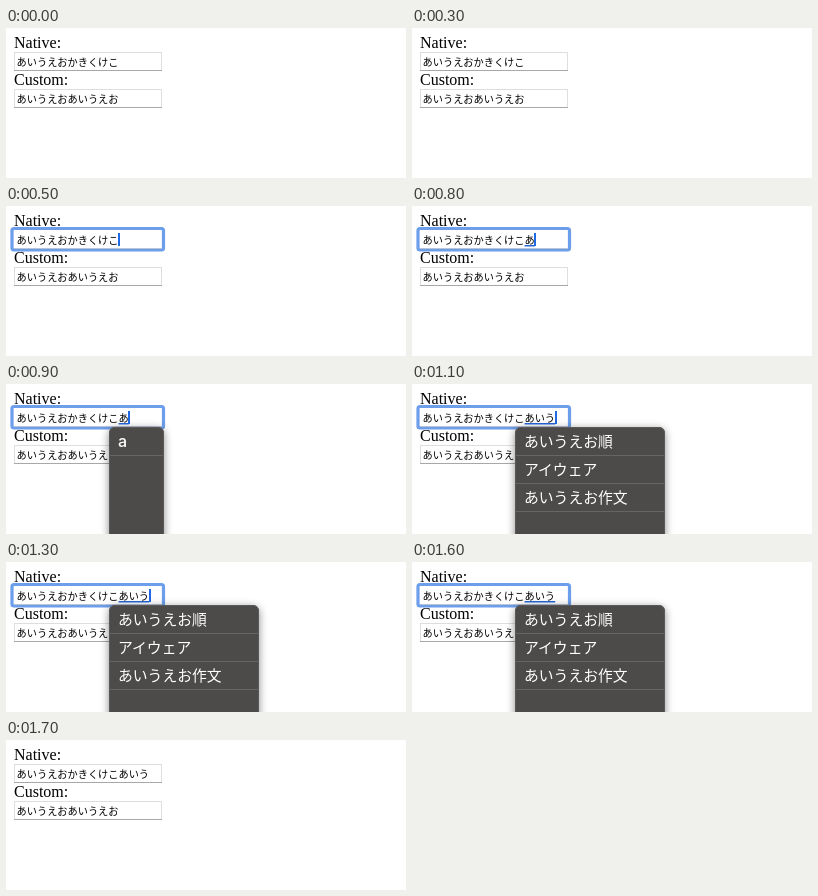
Animation, 400 px wide and 150 px high, one loop 2.4 s. Source, as an HTML page:

```html
<!DOCTYPE html>
<html lang="ja">
<head>
<meta charset="utf-8">
<style>
  html, body { margin: 0; width: 100%; height: 100%; overflow: hidden; background: #fff; }
  svg { display: block; }
  .label { font: 16px "Liberation Serif", serif; }
  .field { font: 10.2px "Noto Sans CJK JP", "Noto Sans CJK", sans-serif; }
  .candidate { font: 14.8px "Noto Sans CJK JP", "Noto Sans CJK", sans-serif; fill: #fff; }
  .latin { font: 500 16px Inter, sans-serif; fill: #fff; }
  .popup { filter: drop-shadow(0 2px 4px #0007); }
</style>
</head>
<body>
<svg id="stage" width="400" height="150" viewBox="0 0 400 150"></svg>
<script>
const LOOP = 2400, ADVANCE = 10.2, TEXT_X = 10.6, POPUP_X = 103, ROW = 28;
const stage = document.getElementById("stage");
const nativeText = "あいうえおかきくけこ";

const rect = (x, y, w, h, fill, extra = "") =>
  `<rect x="${x}" y="${y}" width="${w}" height="${h}" fill="${fill}" ${extra}/>`;
const text = (x, y, style, content) =>
  `<text x="${x}" y="${y}" class="${style}">${content}</text>`;

function field(y, title, value, focused) {
  const ring = focused
    ? rect(6, y - 1.5, 151.5, 21.5, "#fff", 'rx="2" stroke="#6d9eeb" stroke-width="3.2"') : "";
  const border = rect(8.5, y + .5, 147, 18, "#fff", 'stroke="#dedede"') +
    rect(8, y + 18, 148, 1, "#a8a8a8");
  return text(8, y - 4, "label", title) + (focused ? ring + rect(8, y + 18, 148, 1, "#b9c4d6") : border) +
    text(TEXT_X, y + 14, "field", value);
}

// Face blowing a kiss
const kiss = `<g transform="translate(122.5 86)">
  <circle r="9" fill="#fdc940"/>
  <g fill="none" stroke="#6b3f12" stroke-width="1.4" stroke-linecap="round">
    <path d="M-6-4q2-2 4-.5M2.5-3l4 .5M-.5 1.5q3 .3 1 2q2.500 1.500-.8 2.500"/>
  </g>
  <circle cx="-3.8" cy="-1.500" r="1.500" fill="#6b3f12"/>
  <path d="M5.500 9C1 6 1 3 3 2.500Q5 2 5.500 4Q7 1.500 9 3C10.500 5 8 8 5.500 9Z" fill="#e8324a"/>
</g>`;

const info = `<g transform="translate(194 86)" stroke="#ddd" fill="none">
  <circle r="4.300"/><path d="M-1-.5H.2V2.300M-1.300 2.300H1.500M0-2.500v1"/>
</g>`;

function popup(width, rows) {
  let out = rect(POPUP_X, 43, width, 130, "#4d4b49", 'rx="6" class="popup"') +
    rect(POPUP_X + .5, 43.5, width - 1, 130, "none", 'rx="5.500" stroke="#5b5957"');
  rows.forEach((row, i) => {
    const y = 43 + i * ROW;
    if (row === "kiss") out += kiss + info;
    else out += text(112, y + 20, row === "a" ? "latin" : "candidate", row);
    if (y + ROW < 150) out += rect(POPUP_X + 1, y + ROW, width - 2, 1, "#676563");
  });
  return out;
}

const menus = {
  "あ": [55, ["a"]],
  "あい": [106, ["会いたい", "kiss", "空いてる", "あいてる"]],
  "あいう": [150, ["あいうえお順", "アイウェア", "あいうえお作文"]]
};

function draw(t) {
  const focused = t >= 500 && t < 1700;
  const typed = t < 800 ? "" : t < 1000 ? "あ" : t < 1100 ? "あい" : "あいう";
  const value = nativeText + typed;
  const caretX = TEXT_X + value.length * ADVANCE;
  let out = field(24, "Native:", value, focused) + field(61, "Custom:", "あいうえおあいうえお", false);
  if (focused) {
    if (typed) {
      const start = TEXT_X + nativeText.length * ADVANCE;
      out += rect(start, 39, caretX - start, 1.5, "#2467d8");
    }
    if (t < 1600) out += rect(Math.round(caretX - .5), 27, 2, 13, "#1f69e5");
    if (t >= 900) out += popup(...menus[typed]);
  }
  return out;
}

let shown = "";
function tick() {
  const next = draw(performance.now() % LOOP);
  if (next !== shown) stage.innerHTML = shown = next;
  requestAnimationFrame(tick);
}
tick();
</script>
</body>
</html>
```
